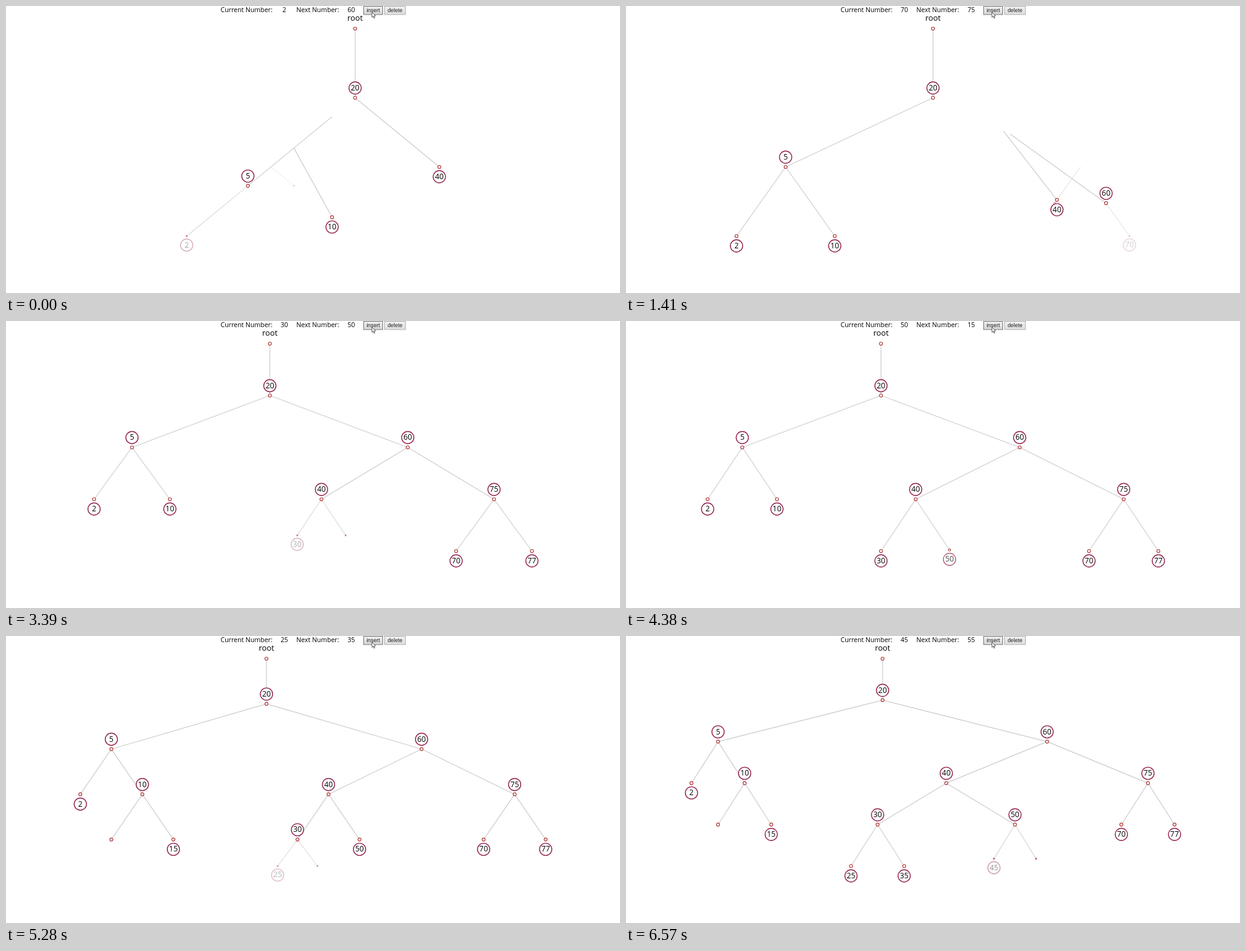
Animation of 1000x469 px, one loop 6.6 s. Source, as an HTML page with a canvas:

```html
<!DOCTYPE html>
<html lang="en">
<head>
<meta charset="utf-8">
<title>Balanced tree insertion</title>
<style>
  html, body { margin: 0; width: 100%; height: 100%; overflow: hidden; background: #fff; }
  canvas { display: block; }
</style>
</head>
<body>
<canvas id="stage" width="1000" height="469"></canvas>
<script>
const ctx = document.getElementById('stage').getContext('2d');
const LOOP = 6600, DURATION = 675;
const SANS = '"Open Sans", "Noto Sans", sans-serif';
const BUTTON_FONT = '8.9px "Liberation Sans", Arial, sans-serif';

// [value, time of the click]
const inserts = [[2, -236], [60, 548], [70, 1280], [75, 1984], [77, 2577], [30, 3169],
  [50, 3899], [15, 4536], [25, 5086], [35, 5681], [45, 6276]];
const lastNext = 55;

const clamp = v => Math.max(0, Math.min(1, v));
const ease = v => 1 - (1 - v) ** 3;
const mix = (a, b, k) => ({ x: a.x + (b.x - a.x) * k, y: a.y + (b.y - a.y) * k });

// ---- AVL tree, immutable; ascending or descending runs need single rotations only
const make = (value, left, right) => ({ value, left, right });
const height = n => n ? 1 + Math.max(height(n.left), height(n.right)) : 0;

function insert(n, value) {
  if (!n) return make(value, null, null);
  let { left: l, right: r } = n;
  if (value < n.value) l = insert(l, value); else r = insert(r, value);
  const balance = height(l) - height(r);
  if (balance > 1) return make(l.value, l.left, make(n.value, l.right, r));
  if (balance < -1) return make(r.value, make(n.value, l, r.left), r.right);
  return make(n.value, l, r);
}

// ---- tidy layout: siblings 1 unit apart, cousins 2
function toView(n, parent) {
  if (!n) return { key: 'empty' + parent, label: '', kids: [] };
  const kids = n.left || n.right ? [n.left, n.right].map(k => toView(k, n.value)) : [];
  return { key: String(n.value), label: String(n.value), kids };
}

function measure(n) {
  n.kids.forEach(measure);
  n.lo = [0];
  n.hi = [0];
  n.gap = 0;
  if (!n.kids.length) return;
  const a = n.kids[0], b = n.kids[n.kids.length - 1];
  if (a !== b) {
    const shared = Math.min(a.lo.length, b.lo.length);
    for (let d = 0; d < shared; d++) n.gap = Math.max(n.gap, a.hi[d] - b.lo[d] + (d ? 2 : 1));
  }
  const half = n.gap / 2;
  for (let d = 0; d < Math.max(a.lo.length, b.lo.length); d++) {
    n.lo.push(d < a.lo.length ? a.lo[d] - half : b.lo[d] + half);
    n.hi.push(d < b.hi.length ? b.hi[d] + half : a.hi[d] - half);
  }
}

function layout(tree) {
  const top = { key: 'root', label: 'root', kids: [toView(tree)] };
  measure(top);
  const min = Math.min(...top.lo), unit = 960 / (Math.max(...top.hi) - min + 2);
  const step = 339 / (top.lo.length - 1);
  const places = new Map();
  (function place(n, u, depth, parent) {
    places.set(n.key, { x: 20 + (u - min + 1) * unit, y: 37 + depth * step,
      parent, label: n.label, leaf: !n.kids.length });
    n.kids.forEach((kid, i) =>
      place(kid, u + (n.kids.length > 1 ? (i - 0.5) * n.gap : 0), depth + 1, n.key));
  })(top, 0, 0, null);
  return places;
}

// ---- one transition for each insertion
let tree = [20, 10, 40, 5].reduce(insert, null);
let before = layout(tree);
let born = new Map();
const transitions = inserts.map(([value, start], i) => {
  tree = insert(tree, value);
  const after = layout(tree);
  born = new Map([...after.keys()].map(key =>
    [key, before.has(key) ? born.get(key) ?? -1e9 : start]));
  const step = { value, start, before, after, born,
    next: i + 1 < inserts.length ? inserts[i + 1][0] : lastNext,
    sink: after.get(after.get(String(value)).parent) };
  before = after;
  return step;
});

// ---- drawing
function text(str, x, y, font, align = 'left', color = '#000') {
  ctx.font = font;
  ctx.textAlign = align;
  ctx.fillStyle = color;
  ctx.fillText(str, x, y);
}

function line(a, b, alpha) {
  ctx.globalAlpha = alpha;
  ctx.strokeStyle = '#ccc';
  ctx.lineWidth = 1.2;
  ctx.beginPath();
  ctx.moveTo(a.x, a.y);
  ctx.lineTo(b.x, b.y);
  ctx.stroke();
}

function ring(x, y, r, stroke, width, fill, alpha) {
  ctx.globalAlpha = alpha;
  ctx.beginPath();
  ctx.arc(x, y, r, 0, 2 * Math.PI);
  ctx.fillStyle = fill;
  ctx.fill();
  ctx.strokeStyle = stroke;
  ctx.lineWidth = width;
  ctx.stroke();
}

const dot = (p, size, alpha) => ring(p.x, p.y, 2.5 * size, '#b23a3a', 1.2, '#fff', alpha);

function drawNode(p, node, age) {
  dot(p, age, ease(age));
  if (!node.label) return;
  ctx.globalAlpha = age;
  if (!node.parent) return text(node.label, p.x, 24.3, '12.8px ' + SANS, 'center');
  const y = p.y + (node.leaf ? 1 : -1) * (14 + 2 * age);
  ring(p.x, y, 10, '#93204f', 1.4, 'rgba(255,255,255,.7)', age);
  text(node.label, p.x, y + 3.9, '12.3px ' + SANS, 'center');
}

function drawTree({ start, before, after, born, sink }, t) {
  const k = ease(clamp((t - start) / DURATION));
  const ageOf = key => clamp((t - born.get(key)) / DURATION);
  const origin = key => before.get(key) || before.get(after.get(key).parent);
  const at = key => mix(origin(key), after.get(key), k);
  const leaving = [...before].filter(([key]) => !after.has(key));

  for (const [key, node] of after) {
    if (!node.parent) continue;
    const old = before.get(key);
    const from = before.get(old ? old.parent : node.parent);
    line(mix(from, after.get(node.parent), k), at(key), ease(ageOf(key)));
  }
  for (const [, node] of leaving) {
    const p = mix(node, sink, k);
    line(mix(before.get(node.parent), sink, k), p, 1 - k);
    dot(p, 1 - k, 1 - k);
  }
  for (const [key, node] of after) drawNode(at(key), node, ageOf(key));
  ctx.globalAlpha = 1;
}

function button(label, x, w, top, bottom, border) {
  const shade = ctx.createLinearGradient(0, 0, 0, 14);
  shade.addColorStop(0, top);
  shade.addColorStop(1, bottom);
  ctx.fillStyle = shade;
  ctx.fillRect(x, 0, w, 14);
  ctx.strokeStyle = border;
  ctx.lineWidth = 1;
  ctx.strokeRect(x + 0.5, 0.5, w - 1, 13.5);
  text(label, x + w / 2, 10, BUTTON_FONT, 'center', '#222');
}

function drawCursor() {
  ctx.beginPath();
  [[596, 10], [596, 18.5], [598, 16.7], [599.4, 20], [600.7, 19.4], [599.3, 16.3], [602, 16.1]]
    .forEach(([x, y]) => ctx.lineTo(x, y));
  ctx.closePath();
  ctx.fillStyle = '#fff';
  ctx.fill();
  ctx.strokeStyle = '#333';
  ctx.lineWidth = 0.8;
  ctx.stroke();
}

function drawHeader({ value, next }) {
  const font = '10.6px ' + SANS;
  text('Current Number:', 349.5, 10, font);
  text(value, 453.3, 10, font, 'center');
  text('Next Number:', 472.8, 10, font);
  text(next, 562.2, 10, font, 'center');
  button('insert', 582, 32, '#f0f0f0', '#d6d6d6', '#777');
  button('delete', 616, 35, '#f2f2f2', '#dddddd', '#b0b0b0');
  drawCursor();
}

function frame() {
  const t = performance.now() % LOOP;
  const current = transitions.filter(s => s.start <= t).pop();
  ctx.fillStyle = '#fff';
  ctx.fillRect(0, 0, 1000, 469);
  drawTree(current, t);
  drawHeader(current);
  requestAnimationFrame(frame);
}
requestAnimationFrame(frame);
</script>
</body>
</html>
```
